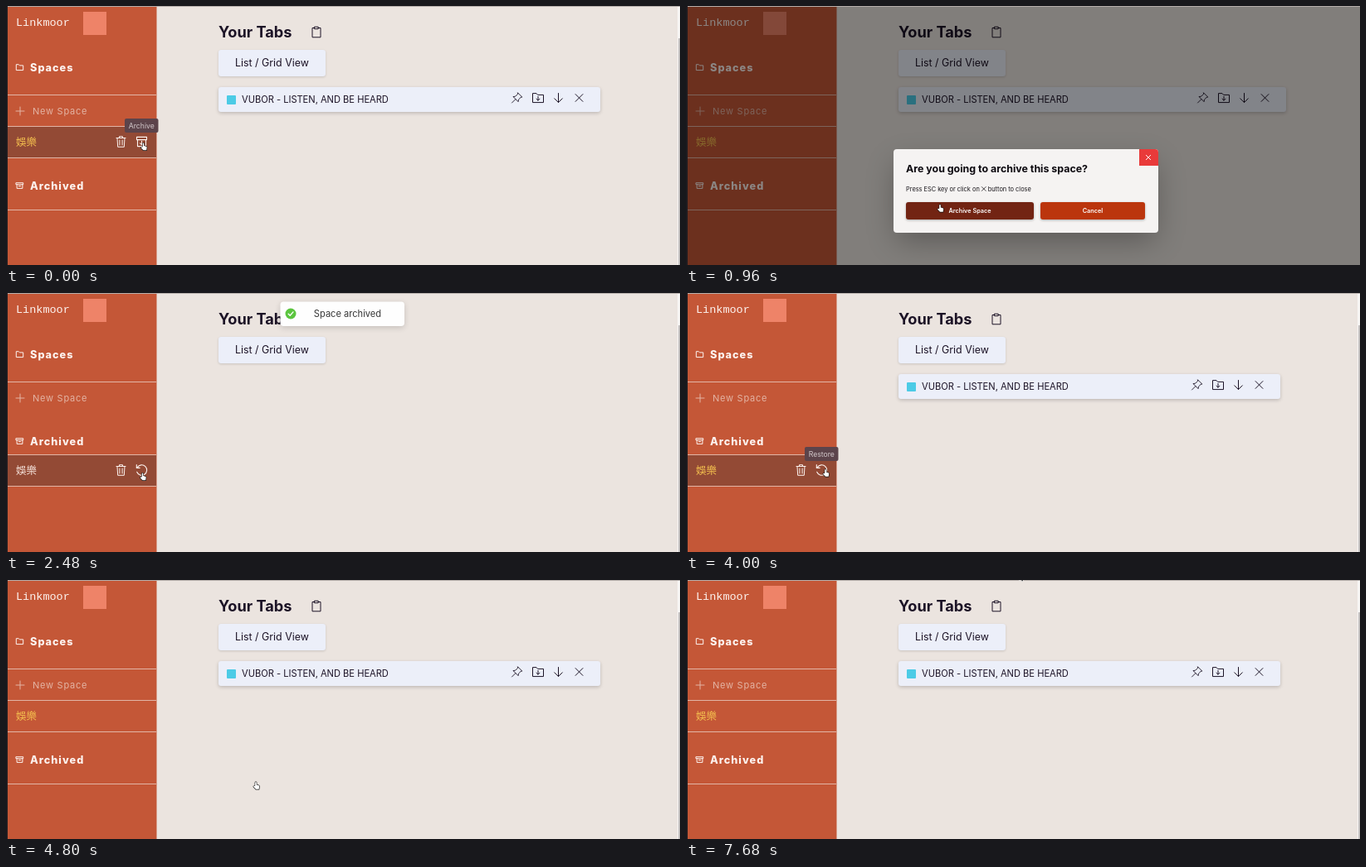
An HTML page with a canvas for the animation above (7.76 s loop, 812 by 313 pixels).

```html
<!DOCTYPE html>
<html lang="en">
<head>
<meta charset="utf-8">
<title>Archive and restore a space</title>
<style>
  html, body { margin: 0; width: 100%; height: 100%; overflow: hidden; background: #ebe4df; }
  canvas { display: block; width: 812px; height: 313px; }
</style>
</head>
<body>
<canvas id="stage"></canvas>
<script>
const W = 812, H = 313, LOOP = 7760, STEP = 80;
const canvas = document.getElementById('stage');
const ctx = canvas.getContext('2d');
const ratio = window.devicePixelRatio || 1;
canvas.width = W * ratio;
canvas.height = H * ratio;

const SANS = 'Inter, "Noto Sans", sans-serif';
const CJK = '"Noto Sans CJK TC", "Noto Sans CJK", sans-serif';
const MONO = '"Liberation Mono", monospace';
const INK = '#1c1326', WHITE = '#fdf3ef', PALE = '#e3b4a4';

// Pointer hot spot: time, x, y
const PATH = [
  [0, 165.5, 165.5], [560, 165.5, 165.5], [880, 306, 240], [1840, 306, 240],
  [2400, 164.5, 217.5], [2480, 164.5, 217.5], [2800, 60, 212], [3440, 60, 212],
  [3840, 168, 213], [4240, 168, 213], [4560, 301, 244], [6640, 301, 244],
  [7200, 402, -7], [LOOP, 402, -7]
];
const HAND_TIMES = [[0, 620], [860, 1880], [2300, 4200], [4480, 5100]];

const ICONS = {
  folder: 'M-4.2 3.2V-3.3H-1.2L0 -2.1H4.2V3.2Z',
  plus: 'M-5 0H5M0 -5V5',
  box: 'M-4.2 -3.3H4.2V-1.3H-4.2ZM-3.4 -1.3V3.4H3.4V-1.3M-1.2 .6H1.2',
  trash: 'M-5.5 -4.5H5.5M-2 -4.5V-6.3H2V-4.5M-4.5 -4.5L-3.8 6.3H3.8L4.5 -4.5M-1.6 -2V4M1.6 -2V4',
  archive: 'M-6 -5.6H6V-2.4H-6ZM-5 -2.4V5.6H5V-2.4M0 -.8V3.6M-2 1.8L0 3.7L2 1.8',
  restore: 'M-5.2 -3.4A6.2 6.2 0 1 1 -5.8 2.3M-6.2 -6.4V-2.6H-2.4',
  clipboard: 'M-2.2 -5H-5V6.3H5V-5H2.2M-2.2 -6.3H2.2V-3.8H-2.2Z',
  pin: 'M1.2 -6L6.3 -.9L4.6 -.5L2 2L1.6 4.7L-4.5 -1.4L-1.8 -1.8L.8 -4.4ZM-1.6 1.6L-6 6',
  folderDown: 'M-6.5 5.2V-5.4H-2L-.4 -3.6H6.5V5.2ZM0 -1.6V3M-2 1.2L0 3.2L2 1.2',
  down: 'M0 -5.5V5.5M-4.8 .8L0 5.6L4.8 .8',
  cross: 'M-4.4 -4.4L4.4 4.4M4.4 -4.4L-4.4 4.4',
  tick: 'M-2.8 .2L-.8 2.2L3 -2.1'
};
for (const name in ICONS) ICONS[name] = new Path2D(ICONS[name]);
const HAND = new Path2D('M-.8 4.7V.9A.8 .8 0 0 1 .8 .9V3.6L3.4 4.2Q4.3 4.5 4.2 5.5L3.7 8.8H0L-2.7 6Q-3.1 5 -2.2 5Z');
const ARROW = new Path2D('M0 0V7.4L1.7 6L2.8 8.4L4 7.9L2.9 5.5H5Z');

const clamp = v => Math.max(0, Math.min(1, v));
const ramp = (t, from, length) => clamp((t - from) / length);
const ease = p => p * p * (3 - 2 * p);
const within = (t, a, b) => t >= a && t < b;

function text(str, x, y, size, color, opt = {}) {
  ctx.font = `${opt.weight || 400} ${size}px ${opt.font || SANS}`;
  ctx.letterSpacing = (opt.spacing || 0) + 'px';
  ctx.textAlign = opt.align || 'left';
  ctx.fillStyle = color;
  ctx.fillText(str, x, y);
  return x + ctx.measureText(str).width;
}

function rect(x, y, w, h, color, radius = 0, shadow) {
  ctx.save();
  if (shadow) {
    ctx.shadowColor = `rgba(0,0,0,${shadow[0]})`;
    ctx.shadowOffsetY = shadow[1] * ratio;
    ctx.shadowBlur = shadow[2] * ratio;
  }
  ctx.fillStyle = color;
  ctx.beginPath();
  ctx.roundRect(x, y, w, h, radius);
  ctx.fill();
  ctx.restore();
}

function icon(name, x, y, color, width = 1, scale = 1) {
  ctx.save();
  ctx.translate(x, y);
  ctx.scale(scale, scale);
  ctx.strokeStyle = color;
  ctx.lineWidth = width / scale;
  ctx.lineJoin = ctx.lineCap = 'round';
  ctx.stroke(ICONS[name]);
  ctx.restore();
}

function pointerAt(t) {
  const i = Math.max(1, PATH.findIndex(k => k[0] >= t));
  const [t0, x0, y0] = PATH[i - 1], [t1, x1, y1] = PATH[i];
  const p = ease(ramp(t, t0, t1 - t0));
  return { x: x0 + (x1 - x0) * p, y: y0 + (y1 - y0) * p };
}

function drawPointer(t, { x, y }) {
  const hand = HAND_TIMES.some(([a, b]) => within(t, a, b));
  ctx.save();
  ctx.translate(x, y);
  ctx.lineJoin = 'round';
  ctx.lineWidth = 1.2;
  ctx.strokeStyle = hand ? '#111' : '#fff';
  ctx.fillStyle = hand ? '#fff' : '#111';
  ctx.stroke(hand ? HAND : ARROW);
  ctx.fill(hand ? HAND : ARROW);
  ctx.restore();
}

function drawSidebar(s) {
  rect(2, 0, 179.5, H, '#c45737');
  text('Linkmoor', 12, 24, 13.5, WHITE, { font: MONO });
  rect(93, 7, 28, 28, '#ee8368');
  icon('folder', 16.5, 74, WHITE);
  text('Spaces', 29, 78.5, 12.7, WHITE, { weight: 800, spacing: 1 });
  icon('plus', 17, 127, PALE);
  text('New Space', 32, 131, 11, PALE, { spacing: .75 });

  const headY = s.archived ? 179 : 217;
  icon('box', 16.5, headY, WHITE);
  text('Archived', 29, headY + 4.5, 12.7, WHITE, { weight: 800, spacing: 1 });

  const rowY = s.archived ? 196 : 146;
  if (s.rowHover) {
    rect(2, rowY, 179, 37, '#934a35');
    icon('trash', 138.5, rowY + 18, WHITE);
    icon(s.archived ? 'restore' : 'archive', 163.5, rowY + 18, WHITE, 1.1);
  }
  text('娛樂', 12, rowY + 23, 12.5, s.selected ? '#f4c04f' : '#f6e3db', { font: CJK });

  const lines = s.archived ? [107, 195, 233] : [107, 145, 183, 246];
  for (const y of lines) rect(2, y, 179, 1, '#e2b5a6');
}

function drawMain(s) {
  const shift = s.modal > 0 ? 7 : 0;
  text('Your Tabs', 256, 38, 18.2, INK, { weight: 700 });
  icon('clipboard', 374, 31.5, INK);
  rect(256, 53, 129, 32, '#eceff9', 3, [.15, 1, 3]);
  text('List / Grid View', 276, 73.3, 12.4, INK);
  if (s.selected) {
    rect(256, 98, 460 + shift, 30, '#eceff9', 3, [.2, 1.5, 4]);
    rect(266, 108, 11, 11, '#4ccbe6', 1);
    text('VUBOR - LISTEN, AND BE HEARD', 284, 117, 11.1, INK);
    icon('pin', 615.5 + shift, 111, INK, .9);
    icon('folderDown', 641 + shift, 111, INK);
    icon('down', 665.5 + shift, 111, INK);
    icon('cross', 690.5 + shift, 111, INK);
  }
  if (!shift) {
    rect(809, 0, 3, H, '#f7f5f4');
    rect(810, 39, 2, H - 39, '#c4c1c0');
  }
}

function drawTooltip(s) {
  if (!s.tip) return;
  const x = s.modal > 0 ? 150 : 143, y = s.archived ? 186 : 136;
  ctx.globalAlpha = s.tip;
  rect(x, y, 40.5, 17, '#5c444b', 2);
  text(s.archived ? 'Restore' : 'Archive', x + 20.3, y + 11.7, 8.7, '#d2c8ca', { align: 'center' });
  ctx.globalAlpha = 1;
}

function drawButton(label, x, w, pointer) {
  const over = within(pointer.x, x, x + w) && within(pointer.y, 237, 258);
  rect(x, 237, w, 21, over ? '#722413' : '#bb350d', 3, [.3, 1, 3]);
  text(label, x + w / 2, 250.2, 7.3, '#fff', { weight: 600, align: 'center' });
}

function drawModal(s, pointer) {
  const verb = s.archived ? 'Restore' : 'Archive';
  ctx.globalAlpha = s.modal;
  rect(254, 177, 311, 93, '#f5f3f2', 4, [.3, 13, 36]);
  rect(250, 173, 319, 101, '#f5f3f2', 4);
  rect(546, 173, 23, 20, '#e93a3a', [0, 4, 0, 0]);
  icon('cross', 557, 183, '#fff', 1, .6);
  text(`Are you going to ${verb.toLowerCase()} this space?`, 265, 201, 12.4, '#0d0a10', { weight: 700 });
  const gap = text('Press ESC key or click on ', 265, 223.5, 7.4, '#1a171c');
  icon('cross', gap + 2.9, 221, '#1a171c', .8, .55);
  text(' button to close', gap + 5.8, 223.5, 7.4, '#1a171c');
  drawButton(`${verb} Space`, 265, 154, pointer);
  drawButton('Cancel', 427, 126, pointer);
  ctx.globalAlpha = 1;
}

function drawToast(label, shown) {
  if (!shown) return;
  ctx.save();
  ctx.globalAlpha = shown;
  ctx.translate(0, (shown - 1) * 40);
  rect(330.5, 10.5, 149.5, 29.5, '#fefefe', 4, [.16, 2, 7]);
  rect(336.5, 18.5, 13, 13, '#5bc53f', 6.5);
  icon('tick', 343, 25, '#fff', 1.4);
  text(label, 411.5, 29, 11.1, '#363636', { align: 'center' });
  ctx.restore();
}

function draw(t) {
  const fade = (open, close) => ramp(t, open, 160) * (1 - ramp(t, close, 160));
  const toast = (start, end) => ease(ramp(t, start, 240) * (1 - ramp(t, end, 320)));
  const s = {
    archived: within(t, 1840, 4800),
    selected: !within(t, 1840, 3040),
    rowHover: t < 540 || within(t, 2340, 4050),
    modal: Math.max(fade(480, 1680), fade(4000, 4640)),
    tip: t < 2000 ? 1 - ramp(t, 480, 200) : ramp(t, 3760, 160) * (1 - ramp(t, 4000, 200))
  };
  const pointer = pointerAt(t);

  ctx.setTransform(ratio, 0, 0, ratio, 0, 0);
  rect(0, 0, W, H, '#ebe4df');
  drawMain(s);
  drawSidebar(s);
  drawTooltip(s);
  if (s.modal) {
    rect(0, 0, W, H, `rgba(0,0,0,${.45 * s.modal})`);
    drawModal(s, pointer);
  }
  drawToast('Space archived', toast(1840, 3040));
  drawToast('Space restored', toast(4800, 6800));
  rect(0, 0, 2, H, '#1f1c20');
  rect(2, 0, W - 2, 1, '#b5aeab');
  drawPointer(t, pointer);
}

const start = performance.now();
function tick() {
  const t = (performance.now() - start) % LOOP;
  draw(Math.floor(t / STEP) * STEP);
  requestAnimationFrame(tick);
}
tick();
</script>
</body>
</html>
```
